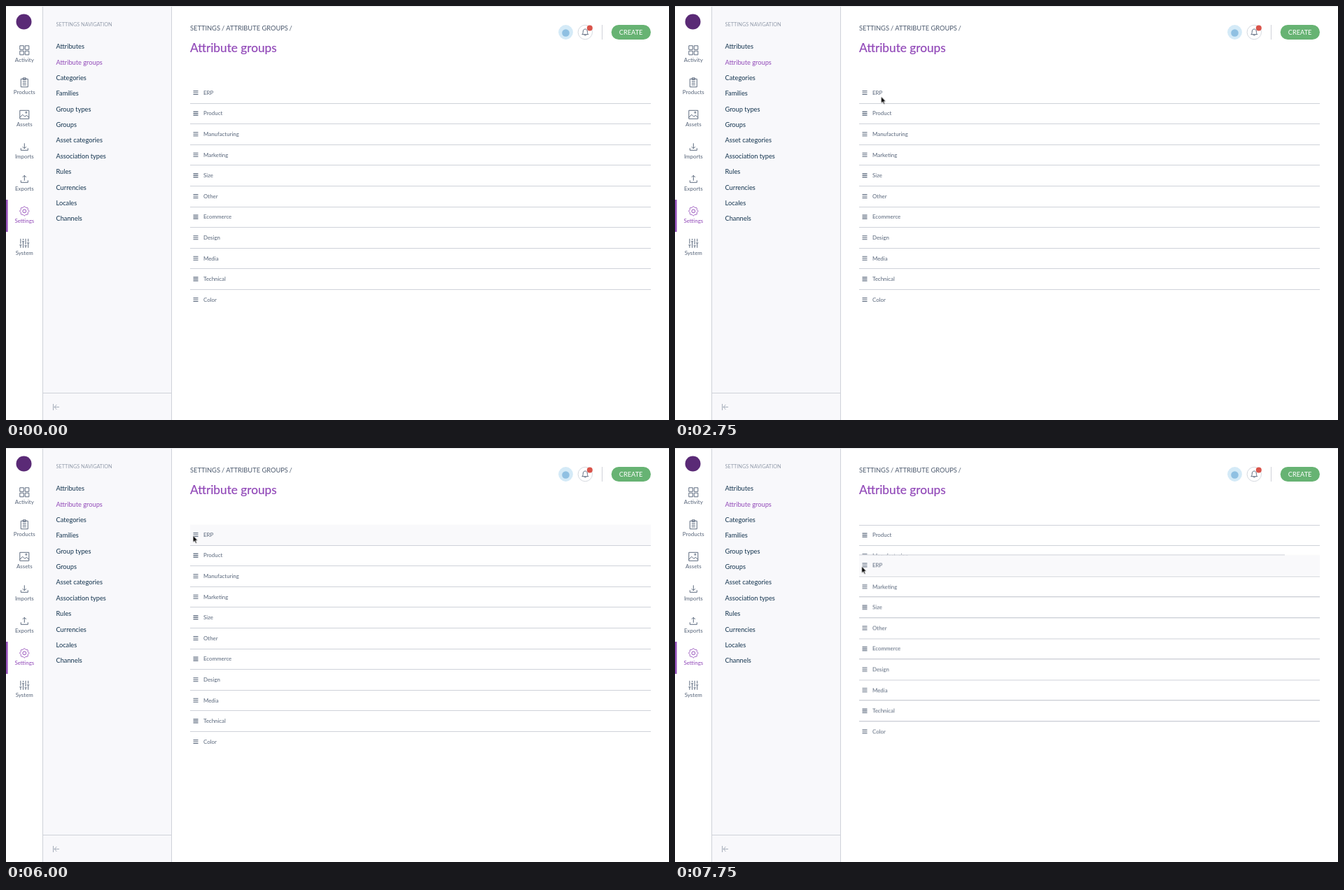
Write an HTML page that moves like this. It is 947 px wide and 592 px high and loops after 8000 ms.

```html
<!DOCTYPE html>
<html lang="en">
<head>
<meta charset="utf-8">
<title>Attribute groups</title>
<style>
html, body { margin: 0; width: 100%; height: 100%; overflow: hidden; background: #fff; }
svg { display: block; width: 947px; height: 592px; font-family: Lato, sans-serif; fill: #566479; }
.icon { fill: none; stroke: #566479; stroke-width: .95; }
.active { fill: #9148b8; }
.active .icon { stroke: #9148b8; }
.edge { fill: #cfd2d9; shape-rendering: crispEdges; }
.side { font-size: 7.95px; text-anchor: middle; }
.nav { font-size: 9.25px; fill: #11324d; }
.nav .active { fill: #9148b8; }
.title { font-size: 17.25px; fill: #9148b8; stroke: #9148b8; stroke-width: .2; }
.row { font-size: 7.9px; }
.grip { stroke: #566479; stroke-width: 1.1; fill: none; }
.back { fill: #f9f9fb; }

/* Every change is a hard cut on one 8 s clock */
.cursor, .row, .row0 .back, .row0 .edge, .row1 .edge {
  animation: 8s step-end infinite;
}
.cursor { animation-name: point; }
.row { animation-name: lift; }
.row0 { animation-name: drag; }
.row1 { animation-name: lift-first; }
.row2 { animation-name: lift-second; }
.row0 .back { animation-name: back; }
.row0 .edge { animation-name: drag-edge; }
.row1 .edge { animation-name: covered-edge; }

@keyframes point {
  0% { transform: translate(605px, 31px); opacity: 0; }
  6.25% { transform: translate(605px, 31px); opacity: 1; }
  9.375% { transform: translate(598px, 36.5px); }
  15.625% { transform: translate(582.5px, 44.5px); }
  18.75% { transform: translate(526.5px, 67.5px); }
  21.875% { transform: translate(440.5px, 101.5px); }
  25% { transform: translate(379px, 118.5px); }
  28.125% { transform: translate(325.5px, 128.5px); }
  31.25% { transform: translate(295.5px, 130.5px); }
  34.375% { transform: translate(294.5px, 129.5px); }
  40.625% { transform: translate(278.5px, 126.5px); }
  43.75% { transform: translate(270.5px, 123.5px); }
  46.875%, 50% { transform: translate(267.3px, 124.3px); }
  68.75% { transform: translate(267px, 127px); }
  71.875% { transform: translate(267.2px, 126px); }
  75% { transform: translate(267.2px, 125.3px); }
  90.625% { transform: translate(267px, 136px); }
  93.75% { transform: translate(267px, 155px); }
  96.875%, 100% { transform: translate(266.7px, 169.3px); opacity: 1; }
}
@keyframes lift {
  0% { transform: none; }
  90.625%, 100% { transform: translateY(-14.6px); }
}
@keyframes lift-first {
  0% { transform: none; }
  90.625% { transform: translateY(-14.6px); }
  93.75%, 100% { transform: translateY(-29px); }
}
@keyframes lift-second {
  0% { transform: none; }
  90.625% { transform: translateY(-14.6px); }
  96.875%, 100% { transform: translateY(-29px); }
}
@keyframes drag {
  0% { transform: none; }
  90.625% { transform: translateY(9.4px); }
  93.75% { transform: translateY(28.8px); }
  96.875%, 100% { transform: translateY(43.4px); }
}
@keyframes back {
  0% { opacity: 0; }
  68.75% { opacity: 1; }
  90.625% { opacity: .4; }
  93.75%, 100% { opacity: 1; }
}
@keyframes drag-edge {
  0% { opacity: 0; }
  90.625%, 100% { opacity: 1; }
}
@keyframes covered-edge {
  0% { opacity: 1; }
  90.625% { opacity: 0; }
  93.75%, 100% { opacity: 1; }
}
</style>
</head>
<body>
<svg viewBox="0 0 947 592">
  <rect width="947" height="592" fill="#fff"/>
  <rect x="52" width="185" height="592" fill="#f8f8fb"/>
  <rect class="edge" x="52" width="1" height="592"/>
  <rect class="edge" x="236" width="1" height="592"/>
  <rect class="edge" x="52" y="553" width="185" height="1"/>
  <rect width="947" height="1" fill="#e7e8eb"/>

  <circle cx="25.5" cy="22.5" r="11" fill="#5a2a76"/>
  <rect y="277" width="2.6" height="46" fill="#9452ba"/>
  <g id="side" class="side"></g>

  <text x="71.5" y="29.4" font-size="7.3" fill="#949dac">SETTINGS NAVIGATION</text>
  <g id="nav" class="nav"></g>
  <path class="icon" style="stroke:#a1a9b7" d="M67.5 569v9M76 573.5h-7M72.5 570l-3.5 3.5 3.5 3.5"/>

  <g font-size="9.3" fill="#4c5a6e">
    <text x="263" y="35.4">SETTINGS</text>
    <text x="308" y="35.4">/</text>
    <text x="314.3" y="35.4">ATTRIBUTE GROUPS</text>
    <text x="404.6" y="35.4">/</text>
  </g>
  <text class="title" x="263" y="65.8">Attribute groups</text>

  <circle cx="799.5" cy="37.5" r="10.4" fill="#d4eaf7"/>
  <circle cx="799.5" cy="38.5" r="5.3" fill="#8fc0e2"/>
  <circle cx="827.3" cy="37.5" r="10.2" fill="#fff" stroke="#c9ced6" stroke-width=".8"/>
  <path class="icon" d="M822.8 40.7c1.5-1.2 1.3-2.6 1.5-4.7.2-2 1.4-3 3-3s2.8 1 3 3c.2 2.1 0 3.5 1.5 4.7zM826 41.2a1.4 1.4 0 0 0 2.6 0"/>
  <circle cx="833.8" cy="31.6" r="4" fill="#d9534a"/>
  <rect class="edge" x="851" y="27" width="1" height="21"/>
  <rect x="864.7" y="27" width="56.3" height="21" rx="10.5" fill="#67b373"/>
  <text x="892.6" y="40.8" font-size="9.25" fill="#fff" text-anchor="middle">CREATE</text>

  <g id="rows"></g>

  <g class="cursor">
    <path d="M0 0V9.4L2.2 7.4 3.8 11.1 5.3 10.5 3.7 6.9H6.5Z" fill="#000" stroke="#fff" stroke-width=".6"/>
  </g>
</svg>
<script>
const put = (id, items, draw) => {
  document.getElementById(id).innerHTML = items.map(draw).join('');
};

const gear = Array.from({ length: 64 }, (_, i) => {
  const a = i * Math.PI / 32, r = 6 + .6 * Math.cos(8 * a);
  return `${(r * Math.cos(a)).toFixed(2)} ${(r * Math.sin(a)).toFixed(2)}`;
}).join('L');
const tray = 'M-5 2v3H5V2';
const circle = r => `M${-r} 0a${r} ${r} 0 1 0 ${2 * r} 0a${r} ${r} 0 1 0 ${-2 * r} 0`;
// A slider: vertical track broken around a short knob at height y
const slider = (x, y) => `M${x}-6.5V${y - 1.8}M${x} ${y}V6.5M${x - 1.6} ${y}h3.2`;

// Icon paths are centred on 0,0
const menu = [
  ['Activity', 'M-6.5-6.5h5.5v5.5h-5.5zM1-6.5h5.5v5.5H1zM-6.5 1h5.5v5.5h-5.5zM1 1h5.5v5.5H1z'],
  ['Products', 'M-5-5H5V6.5H-5zM-2-5v-1.5h4V-4h-4zM-2.5-1.5h5M-2.5 1h5M-2.5 3.5h5'],
  ['Assets', 'M-6.5-6h13V6h-13zM-6.5 4l4-4 3 3 2.5-2 3.5 3M1.5-3a1 1 0 1 0 2 0a1 1 0 1 0-2 0'],
  ['Imports', tray + 'M0-5V2.5M-2.5 0L0 2.5 2.5 0'],
  ['Exports', tray + 'M0 2.5V-5M-2.5-2.5L0-5 2.5-2.5'],
  ['Settings', `M${gear}Z${circle(2.4)}`],
  ['System', slider(-5.4, 2.5) + slider(-1.8, -2.5) + slider(1.8, 3.5) + slider(5.4, -.5)]
];
put('side', menu, ([name, path], i) => `
  <g class="${name === 'Settings' ? 'active' : ''}" transform="translate(26.3 ${63.3 + 46 * i})">
    <path class="icon" d="${path}"/><text y="16.7">${name}</text>
  </g>`);

const links = ['Attributes', 'Attribute groups', 'Categories', 'Families', 'Group types', 'Groups',
  'Asset categories', 'Association types', 'Rules', 'Currencies', 'Locales', 'Channels'];
put('nav', links, (name, i) =>
  `<text class="${i === 1 ? 'active' : ''}" x="71.5" y="${61.2 + 22.37 * i}">${name}</text>`);

const groups = ['ERP', 'Product', 'Manufacturing', 'Marketing', 'Size', 'Other', 'Ecommerce',
  'Design', 'Media', 'Technical', 'Color'];
const row = (name, i) => {
  const y = 109 + 29.6 * i;
  return `<g class="row row${i}">
    ${i ? '' : `<rect class="back" x="263" y="${y + .6}" width="658" height="29.4"/>`}
    <rect class="edge" x="263" y="${y}" width="${i ? 658 : 608}" height="1"/>
    <g class="label">
      <path class="grip" d="M267.5 ${y + 12.5}h7m-7 2.5h7m-7 2.5h7"/>
      <text x="282" y="${y + 17.8}">${name}</text>
    </g>
  </g>`;
};
// The dragged row is painted last so it covers the others
const rows = groups.map(row);
put('rows', [...rows.slice(1), rows[0]], html => html);
</script>
</body>
</html>
```
